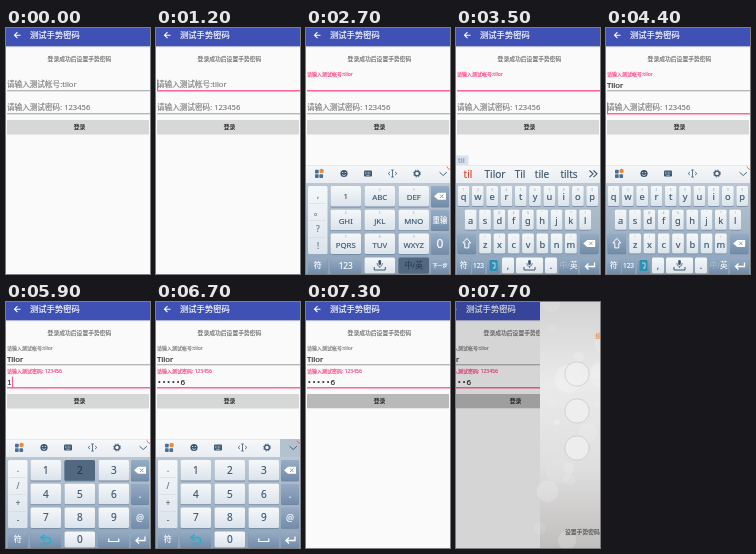
Animation of 144x246 px, one loop 8 s. Source, as an HTML page:

```html
<!DOCTYPE html>
<html lang="zh-CN">
<head>
<meta charset="utf-8">
<style>
html, body { margin: 0; width: 100%; height: 100%; overflow: hidden; background: #fafafa; }
svg { display: block; width: 100vw; height: 100vh; }
text { font-family: "Noto Sans", "Noto Sans CJK SC", "Noto Sans CJK", sans-serif; white-space: pre; }
.mono { font-family: "Noto Sans Mono", "Noto Sans CJK SC", monospace; }
</style>
</head>
<body>
<svg id="stage" viewBox="0 0 144 246" preserveAspectRatio="none"></svg>
<script>
const stage = document.getElementById('stage');
const LOOP = 8000, PINK = '#ff4081', INK = '#3c566f', GREY = '#7c7c7c';
const NAME = 'Tilor';

// Each step replaces the whole screen state at its start time.
const steps = [
  [0, {}],
  [1200, { focus: 1, cursor: 1 }],
  [1700, { focus: 1, float1: 1, pad: 't9' }],
  [2200, { focus: 1, float1: 1, pad: 't9', cursor: 1 }],
  [2700, { focus: 1, float1: 1, pad: 't9', pressed: '中/英' }],
  [3100, { focus: 1, float1: 1, pad: 'qwerty', cursor: 1 }],
  [3500, { focus: 1, float1: 1, pad: 'qwerty', typing: 1 }],
  [4000, { focus: 1, float1: 1, pad: 'qwerty', name: NAME, cursor: 1 }],
  [4400, { focus: 2, float1: 1, pad: 'qwerty', name: NAME, cursor: 1, hot1: 1 }],
  [5000, { focus: 2, float1: 1, float2: 1, pad: 'qwerty', name: NAME }],
  [5300, { focus: 2, float1: 1, float2: 1, pad: 'num', name: NAME, cursor: 1, pressed: '1' }],
  [5900, { focus: 2, float1: 1, float2: 1, pad: 'num', name: NAME, pass: '1', cursor: 1, pressed: '2' }],
  [6300, { focus: 2, float1: 1, float2: 1, pad: 'num', name: NAME, pass: '••••5' }],
  [6700, { focus: 2, float1: 1, float2: 1, pad: 'num', name: NAME, pass: '•••••6', hide: 1 }],
  [7300, { focus: 2, float1: 1, float2: 1, name: NAME, pass: '•••••6', login: 1 }],
  [7700, { focus: 2, float1: 1, float2: 1, name: NAME, pass: '•••••6', login: 1, slide: 1 }]
];

const rect = (x, y, w, h, fill, extra = '') =>
  `<rect x="${x}" y="${y}" width="${w}" height="${h}" fill="${fill}" ${extra}/>`;
const circle = (x, y, r, fill, extra = '') =>
  `<circle cx="${x}" cy="${y}" r="${r}" fill="${fill}" ${extra}/>`;
const line = (d, color = INK, width = 1) =>
  `<path d="${d}" fill="none" stroke="${color}" stroke-width="${width}"/>`;
// Text is placed by its vertical centre; a hairline stroke gives it a little weight.
const text = (x, y, s, size, fill, extra = '') =>
  `<text x="${x}" y="${y + size * .37}" font-size="${size}" fill="${fill}" stroke="${fill}" stroke-width=".15" ${extra}>${s}</text>`;
const mid = (x, y, s, size, fill, extra = '') =>
  text(x, y, s, size, fill, `text-anchor="middle" ${extra}`);

const SWITCH = '<tspan opacity=".6" fill-opacity=".55" stroke="none">中/</tspan>英';

function key(x, y, w, h, label, { size = 9, dark = 0, pressed = 0, sub = '', icon = '' } = {}) {
  const fill = pressed ? '#526880' : dark ? 'url(#darkKey)' : 'url(#lightKey)';
  const ink = pressed ? '#263a50' : dark ? '#fff' : INK;
  const cx = x + w / 2, cy = y + h / 2;
  let out = rect(x, y + .8, w, h, '#6f859d', 'rx="1.5"') + rect(x, y, w, h, fill, 'rx="1.5"');
  if (label) out += mid(cx, cy + (sub ? 1 : 0), label, size, ink);
  if (sub) out += mid(cx, y + 3.5, sub, 3.2, '#93a4b5', 'stroke-opacity="0"');
  if (icon) out += icons[icon](cx, cy);
  return out;
}

const icons = {
  del: (x, y) => `<path d="M${x - 6} ${y}l4-3.5h8v7h-8z" fill="#fff"/>` +
    line(`M${x} ${y - 1.7}l3.4 3.4m0-3.4l-3.4 3.4`, '#7f97b1', .9),
  enter: (x, y) => line(`M${x + 5} ${y - 3}v4h-9m3-3l-3 3l3 3`, '#fff', 1.3),
  shift: (x, y) => line(`M${x} ${y - 5}l4 4.5h-2v5h-4v-5h-2z`, '#fff', 1),
  back: (x, y) => line(`M${x - 1} ${y - 5}l-4 3l4 3m-4-3h6q4 0 4 3t-4 3h-4`, '#27b0c9', 1.4),
  space: (x, y) => line(`M${x - 5} ${y - 1}v3h10v-3`, '#fff', 1.2),
  mic: (x, y) => rect(x - 1.3, y - 5.5, 2.6, 5, INK, 'rx="1.3"') +
    line(`M${x - 2.7} ${y - 2.5}q0 3.5 2.7 3.5t2.7-3.5m-2.7 3.5v1.5`, INK, .7) +
    line(`M${x - 5.5} ${y + 1.5}v3h11v-3`, INK, 1),
  voice: (x, y) => rect(x - 4, y - 5.5, 8, 11, '#2f8fb0', 'rx="1"') +
    line(`M${x - 1.5} ${y - 2.5}h3v5h-2`, '#d8eef5', .8)
};

function toolbar(s) {
  const y = 145.5;
  let out = rect(0, 137, 144, 18, 'url(#bar)') + rect(0, 137, 144, .5, '#d3dae1');
  if (s.typing) {
    out += rect(0, 127.5, 12.5, 9.5, '#d9e2eb') + text(2, 132, 'til', 7.8, '#7d97b2');
    [['til', 12, '#e0442f'], [NAME, 39], ['Til', 64], ['tile', 86], ['tilts', 113]]
      .forEach(([word, x, color]) => out += mid(x, y + .5, word, 10, color || INK));
    return out + line(`M133.5 ${y - 3}l3.5 3.3l-3.5 3.3m4-6.6l3.5 3.3l-3.5 3.3`, INK, 1.1);
  }
  if (s.hide) out += rect(124, 137, 20, 18, '#b4c2d0');
  [[9, 141.8], [9, 146.2], [13.4, 146.2]].forEach(([x, top]) => out += rect(x, top, 3.7, 3.7, '#4a6f94', 'rx=".7"'));
  out += circle(15.6, 143, 2.2, '#f08a32');
  out += circle(38, y, 3.6, INK) + circle(36.7, y - 1, .6, '#fff') + circle(39.3, y - 1, .6, '#fff') +
    line(`M36.2 ${y + 1}q1.8 2.2 3.6 0`, '#fff', .7);
  out += rect(58, y - 3, 8, 6, INK, 'rx="1"') +
    line(`M59 ${y - 1.3}h6m-6 1.5h6`, '#eef2f5', '.6" stroke-dasharray=".9 .6') +
    line(`M60.3 ${y + 1.8}h3.4`, '#eef2f5', .6);
  out += line(`M86.5 ${y - 3.5}v7m-1.3-7h2.6m-2.6 7h2.6M84 ${y - 1.7}l-1.8 1.7l1.8 1.7M89 ${y - 1.7}l1.8 1.7l-1.8 1.7`, INK, .8);
  out += circle(111, y, 2.4, 'none', `stroke="${INK}" stroke-width="1.3"`) +
    circle(111, y, 3.5, 'none', `stroke="${INK}" stroke-width=".9" stroke-dasharray="1.37 1.38"`);
  return out + line(`M133.5 ${y - 1.3}l3.7 3.3l3.7-3.3`, INK, .9) +
    line('M141 138.5q.5 2.5 3 3', '#e0604f', .8);
}

function keypad(s) {
  const num = s.pad === 'num', H = 20.6;
  const labels = ['', 'ABC', 'DEF', 'GHI', 'JKL', 'MNO', 'PQRS', 'TUV', 'WXYZ'];
  let out = rect(2, 158, 19.5, 68, 'url(#lightKey)', 'rx="1.5"');
  (num ? './+-' : ',。?!').split('').forEach((c, i) => {
    const y = 167 + i * 17;
    out += mid(12, y, c, 8, '#5c7288');
    if (i) out += line(`M3 ${y - 8.5}h17`, '#c9d3dc', .5);
  });
  for (let i = 0; i < 9; i++) {
    const x = 24.5 + i % 3 * 34, y = 158 + Math.floor(i / 3) * 23.7, digit = String(i + 1);
    const pressed = s.pressed === digit;
    out += num ? key(x, y, 30.5, H, digit, { size: 10, pressed })
      : key(x, y, 30.5, H, labels[i] || '1', { size: 7.8, sub: i ? digit : '' });
  }
  const side = num ? ['.', '@'] : ['重输', '0'];
  out += key(125, 158, 18, H, '', { dark: 1, icon: 'del' });
  out += key(125, 181.7, 18, H, side[0], { dark: 1, size: num ? 10 : 7.5 });
  out += key(125, 205.4, 18, H, side[1], { dark: 1, size: num ? 9 : 12 });
  out += key(2, 229.5, 19.5, 16, '符', { dark: 1, size: 8 });
  if (num) {
    return out + key(24.5, 229.5, 30.5, 16, '', { dark: 1, icon: 'back' }) + key(58.5, 229.5, 30.5, 16, '0', { size: 10 }) +
      key(92.5, 229.5, 30.5, 16, '', { dark: 1, icon: 'space' }) + key(125, 229.5, 18, 16, '', { dark: 1, icon: 'enter' });
  }
  return out + key(24.5, 229.5, 30.5, 16, '123', { dark: 1, size: 8.3 }) + key(58.5, 229.5, 30.5, 16, '', { icon: 'mic' }) +
    key(92.5, 229.5, 30.5, 16, '中/英', { dark: 1, size: 7.5, pressed: s.pressed === '中/英' }) +
    key(125, 229.5, 18, 16, '下一步', { dark: 1, size: 5 });
}

function qwerty() {
  let out = '';
  [['qwertyuiop', '1234567890', 1.6], ['asdfghjkl', '~!@#%“”*?', 8.8], ['zxcvbnm', '()-_:;/', 23.2]]
    .forEach(([letters, subs, left], row) => [...letters].forEach((c, i) =>
      out += key(left + i * 14.3, 158 + row * 23.7, 11.8, 20, c, { size: 9.3, sub: subs[i] })));
  out += key(1.6, 205.4, 18.4, 20, '', { dark: 1, icon: 'shift' });
  out += key(124, 205.4, 18.4, 20, '', { dark: 1, icon: 'del' });
  [[1, 13.5, '符', 7.5, 1], [16, 13, '123', 6.5, 1], [31, 13, '', 0, 1, 'voice'], [46, 12, ',', 9], [60, 27, '', 0, 0, 'mic'],
    [89, 12, '.', 9], [103, 19, SWITCH, 7.6, 1], [124, 19, '', 0, 1, 'enter']]
    .forEach(([x, w, label, size, dark, icon]) => out += key(x, 229.5, w, 16, label, { size, dark, icon }));
  return out;
}

function field(top, hint, value, floating, focused, hot, cursor) {
  const color = focused || hot ? PINK : GREY;
  let out = floating ? text(1, top - 10.7, hint, 5, color) : text(1, top, hint, 7.6, GREY);
  if (value) out += text(1, top + .5, value, 7.8, '#222', value === NAME ? '' : 'class="mono"');
  out += focused ? rect(1, top + 5.7, 143, 1.2, PINK) : rect(1, top + 6, 143, .7, '#777');
  if (cursor) {
    const x = !value ? 1 : value === NAME ? 20 : 1.5 + value.length * 4.68;
    out += rect(x, top - 5, .9, 11, PINK);
  }
  return out;
}

function form(s) {
  return rect(0, 0, 144, 246, '#fafafa') + rect(0, 0, 144, 18.3, '#3f51b5') +
    rect(0, 18.3, 144, 1, '#000', 'opacity=".12"') +
    line('M14.5 7.2h-6m3-3l-3 3l3 3', '#fff', 1.1) +
    text(24, 7.2, '测试手势密码', 8.3, '#fff', 'font-weight="500"') +
    mid(73.5, 31, '登录成功后设置手势密码', 5.8, '#707070') +
    field(56.5, '请输入测试帐号:tilor', s.name, s.float1, s.focus === 1, s.hot1, s.cursor && s.focus === 1) +
    field(79.5, '请输入测试密码: 123456', s.pass, s.float2, s.focus === 2, 0, s.cursor && s.focus === 2) +
    rect(1, 92.7, 142, 14, '#000', 'opacity=".1" rx=".8"') +
    rect(1, 92, 142, 14, s.login ? '#b9b9b9' : '#d6d7d7', 'rx=".8"') +
    mid(73.5, 99, '登录', 5.8, '#222', 'font-weight="500"');
}

function lockPage() {
  let seed = 7, out = rect(0, 0, 144, 246, 'url(#silver)');
  const random = () => (seed = seed * 16807 % 2147483647) / 2147483647;
  for (let i = 0; i < 60; i++) {
    out += circle(random() * 144, random() * 246, 3 + random() * 11, '#fff', `opacity="${.08 + random() * .16}"`);
  }
  for (let i = 0; i < 9; i++) {
    out += circle(37 + i % 3 * 36, 72 + Math.floor(i / 3) * 37, 12.2, '#f0f0f0',
      'fill-opacity=".75" stroke="#c6c6c6" stroke-width=".7"');
  }
  return out + mid(73, 34, '绘制解锁图案', 5.8, '#f08a32') + text(25, 230, '设置手势密码', 5.8, '#555') +
    text(84, 230, '重新设置', 5.8, '#555');
}

const gradient = (id, ...colors) => `<linearGradient id="${id}" x2="0" y2="1">` +
  colors.map((c, i) => `<stop offset="${i / (colors.length - 1)}" stop-color="${c}"/>`).join('') + '</linearGradient>';
const defs = '<defs>' + gradient('lightKey', '#f5f8fa', '#dbe3eb') + gradient('darkKey', '#96acc4', '#728daa') +
  gradient('bar', '#f6f8fa', '#e9edf1') + gradient('board', '#bcc8d4', '#8ba1b8') +
  gradient('silver', '#d4d3d3', '#eaeaea', '#e0dfdf', '#c0bebd') + '</defs>';

function scene(s) {
  let out = defs + `<g transform="translate(${s.slide ? -14 : 0})">${form(s)}</g>`;
  if (s.pad) {
    out += rect(0, 154, 144, 92, 'url(#board)') + toolbar(s) + (s.pad === 'qwerty' ? qwerty() : keypad(s));
  }
  if (s.slide) {
    out += rect(0, 0, 144, 246, '#000', 'opacity=".15"') + `<g transform="translate(84)">${lockPage()}</g>`;
  }
  return out;
}

let shown = -1;
function draw(now) {
  const t = now % LOOP;
  const index = steps.findLastIndex(([start]) => t >= start);
  if (index !== shown) {
    shown = index;
    stage.innerHTML = scene(steps[index][1]);
  }
  requestAnimationFrame(draw);
}
draw(0);
</script>
</body>
</html>
```
